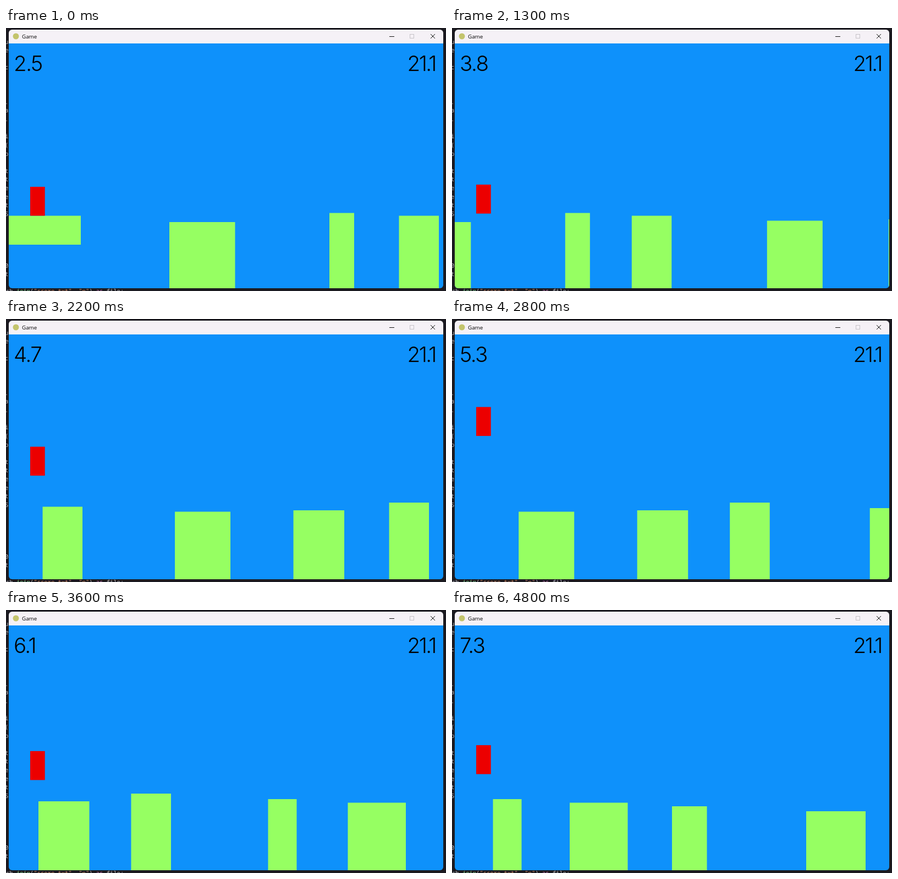
Write an HTML page with a canvas that moves like this. It is 800 by 477 pixels and loops after 4.9 s.

```html
<!DOCTYPE html>
<html lang="en">
<head>
<meta charset="utf-8">
<title>Game</title>
<style>
  html, body { margin: 0; width: 800px; height: 477px; overflow: hidden; background: #1b1a20; }
  canvas { display: block; }
</style>
</head>
<body>
<canvas id="stage" width="800" height="477"></canvas>
<script>
const ctx = document.getElementById("stage").getContext("2d");
const LOOP = 4900, STEP = 100;
const LEFT = 5, TOP = 3, WIDTH = 790, BAR = 28, FLOOR = 472;
const PLAYER = { x: 44, w: 26.7, h: 52.5 };
const MISSED_STEP = 5.5;

// The pace changes here: time, distance scrolled, score.
const PACE = [[0, 0, 2.5], [800, 237, 3.3], [2600, 779.5, 5.1], [4100, 1310.5, 6.66], [4800, 1546.5, 7.3]];

// x at the start, top, width; only the first block floats.
const BLOCKS = [
  [5, 340.5, 131], [297, 352, 119.5], [588, 335.5, 45], [714.5, 340.5, 72.5],
  [960.5, 349.5, 101], [1181.5, 347, 92.5], [1355.5, 333, 72.5], [1610, 343, 52],
  [1755, 349.5, 105.5], [1946.5, 356, 63.5], [2190.5, 365, 108]
];

// Take-off time and launch speed (px/ms); each jump leads to the next block.
const FULL = 0.795, SHORT = 0.5, HALF_GRAVITY = 0.001185;
const JUMPS = [[240, FULL], [1280, FULL], [1955, SHORT], [2400, FULL], [3290, SHORT], [3712, SHORT], [4177, FULL]];

const MONO = "10.5px 'Noto Sans Mono', monospace";
const MARGIN = "u,eG,,ct,,,,.,ay,.a,,ic,(,pp,,tu,to,en,e,tu,Se,,,,,,0,t".split(",");
const GRAY = "#b4b4ba";

function rect(color, x, y, w, h) {
  ctx.fillStyle = color;
  ctx.fillRect(x, y, w, h);
}

function text(str, x, y, font, color, spacing = 0) {
  ctx.font = font;
  ctx.letterSpacing = spacing + "px";
  ctx.fillStyle = color;
  ctx.fillText(str, x, y);
}

function progress(t) {
  const i = Math.max(1, PACE.findIndex(p => t <= p[0]));
  const a = PACE[i - 1], b = PACE[i];
  const u = (t - a[0]) / (b[0] - a[0]);
  return [1, 2].map(k => a[k] + (b[k] - a[k]) * u);
}

function playerTop(t) {
  const jump = JUMPS.findLastIndex(([start]) => start <= t);
  const landing = BLOCKS[jump + 1][1] - PLAYER.h;
  if (jump < 0) return landing;
  const [start, speed] = JUMPS[jump], from = BLOCKS[jump][1] - PLAYER.h;
  const dt = t - start;
  const y = from - speed * dt + HALF_GRAVITY * dt * dt;
  const falling = 2 * HALF_GRAVITY * dt > speed;
  return falling ? Math.min(y, landing) : y;
}

function drawDesktop() {
  rect("#1b1a20", 0, 0, 800, 477);
  MARGIN.forEach((part, i) => text(part, -2, 28.5 + i * 15.62, MONO, GRAY));
  let x = 0;
  for (const [part, color] of [["ch.", GRAY], ["join", "#7fc88a"], ["(", GRAY],
      ['"score.txt"', "#c98a6a"], [", ", GRAY], ['"n"', "#c98a6a"],
      [") ", GRAY], ["as", "#c479b4"], [" file:", GRAY]]) {
    text(part, x, 481, MONO, color);
    x += ctx.measureText(part).width;
  }
}

function drawTitleBar() {
  rect("#f5f1f6", LEFT, TOP, WIDTH, BAR - TOP);
  ctx.fillStyle = "#c3c46c";
  ctx.beginPath();
  ctx.arc(18, 15, 5.5, 0, 7);
  ctx.fill();
  text("Game", 29, 19, "9.8px 'Open Sans', sans-serif", "#000");
  ctx.lineWidth = 1;
  ctx.strokeStyle = "#111";
  ctx.stroke(new Path2D("M697 15.5h9M772 11l8 8M780 11l-8 8"));
  ctx.strokeStyle = "#c6c3c8";
  ctx.strokeRect(734.5, 11.5, 7, 7);
}

function drawBlocks(scroll) {
  // Each block that leaves makes the next two miss one step.
  const missed = BLOCKS.map(() => 0);
  BLOCKS.forEach(([x, top, w], i) => {
    const left = x - scroll + missed[i] * MISSED_STEP;
    if (left + w < LEFT) {
      missed[i + 1]++;
      missed[i + 2]++;
    }
    rect("#96ff62", left, top, w, i ? FLOOR - top : PLAYER.h);
  });
}

function draw(t) {
  const [scroll, score] = progress(t);
  const digits = "350 38.5px Inter, sans-serif";
  drawDesktop();
  ctx.save();
  ctx.beginPath();
  ctx.roundRect(LEFT, TOP, WIDTH, FLOOR - TOP, 6);
  ctx.clip();
  rect("#0e91fb", LEFT, BAR, WIDTH, FLOOR - BAR);
  drawTitleBar();
  drawBlocks(scroll);
  rect("#ec0000", PLAYER.x, playerTop(t), PLAYER.w, PLAYER.h);
  text(score.toFixed(1), 14, 78, digits, "#000", -1.5);
  text("21.1", 729.5, 78, digits, "#000", -2.5);
  ctx.restore();
}

const start = performance.now();
function tick() {
  const t = (performance.now() - start) % LOOP;
  draw(Math.floor(t / STEP) * STEP);
  requestAnimationFrame(tick);
}
tick();
</script>
</body>
</html>
```
